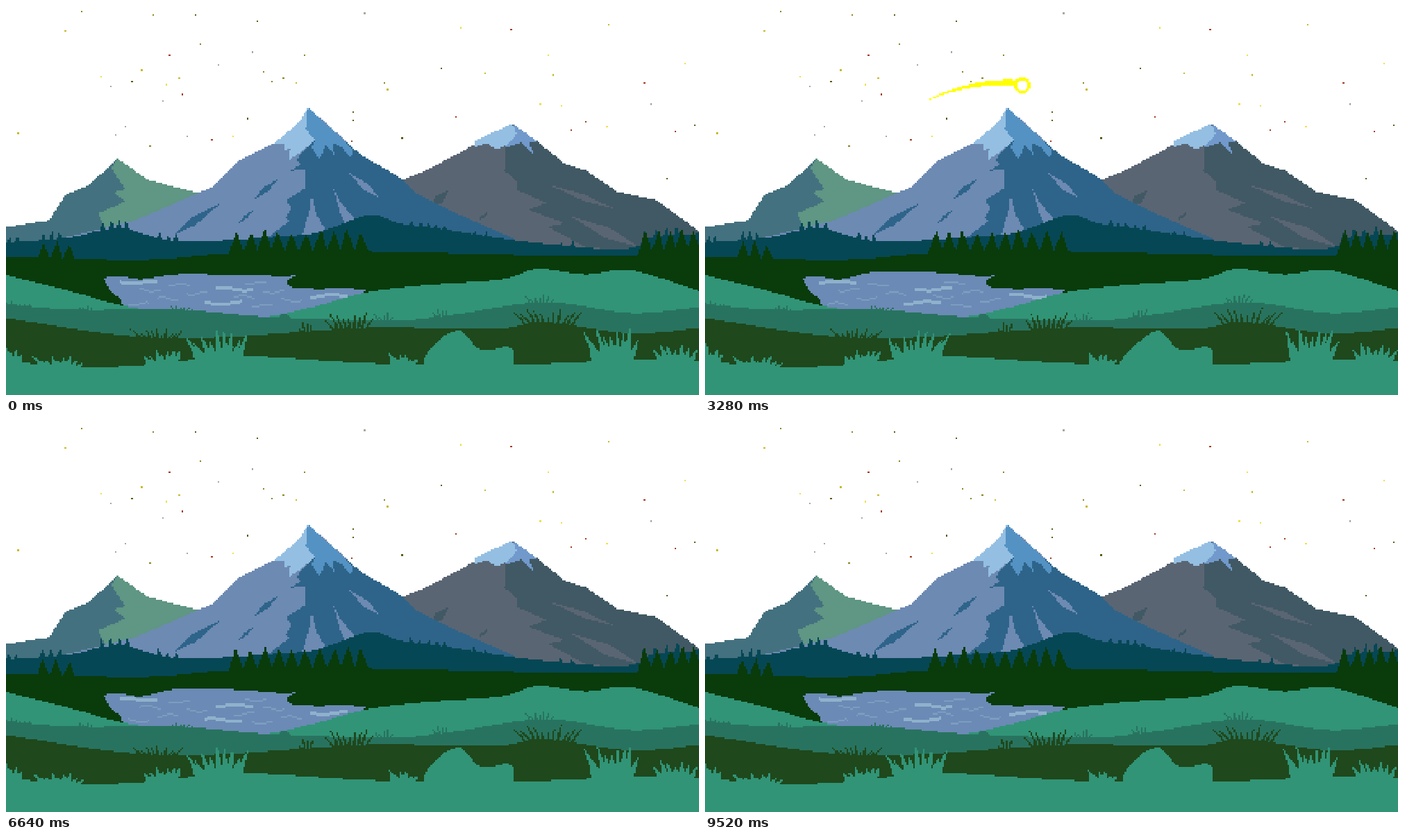
Write an HTML page with a canvas that moves like this. It is 998 by 561 pixels and loops after 9600 ms.

```html
<!DOCTYPE html>
<html lang="en">
<head>
<meta charset="utf-8">
<title>Mountain valley</title>
<style>
html, body { margin: 0; width: 100%; height: 100%; overflow: hidden; background: #fff; }
canvas { display: block; width: 998px; height: 561px; image-rendering: pixelated; }
</style>
</head>
<body>
<canvas id="c" width="426" height="240"></canvas>
<script>
const W = 426, H = 240, SX = W / 998, SY = H / 561, LOOP = 9600, STEP = 80, TAU = Math.PI * 2;
const ctx = document.getElementById('c').getContext('2d');
const image = ctx.createImageData(W, H);
const px = new Uint32Array(image.data.buffer);

const rgb = hex => {
  const n = parseInt(hex.slice(1), 16);
  return (0xff000000 | (n & 255) << 16 | (n & 0xff00) | n >> 16) >>> 0;
};
const lerp = (a, b, k) => a + (b - a) * k;
const rand = n => {
  const v = Math.sin(n * 12.9898 + 4.1) * 43758.5453;
  return v - Math.floor(v);
};

const WHITE = rgb('#ffffff');
const TEAL = '#064755', PINE = '#0a3b0b', HILL = '#319477', MID = '#28735f', OLIVE = '#1f481c', WATER = '#6b8ab5';
let sky = null;

// Hard-edged even-odd fill; points are in stage coordinates.
function poly(hex, pts, mask) {
  const col = rgb(hex), n = pts.length;
  for (let y = 0; y < H; y++) {
    const xs = [];
    for (let i = 0; i < n; i += 2) {
      const j = (i + 2) % n, ya = pts[i + 1] * SY, yb = pts[j + 1] * SY;
      if ((ya <= y + .5) !== (yb <= y + .5)) {
        xs.push(lerp(pts[i], pts[j], (y + .5 - ya) / (yb - ya)) * SX);
      }
    }
    xs.sort((a, b) => a - b);
    for (let k = 0; k + 1 < xs.length; k += 2) {
      const end = Math.min(W, Math.ceil(xs[k + 1] - .5));
      for (let x = Math.max(0, Math.ceil(xs[k] - .5)); x < end; x++) {
        if (!mask || mask[y * W + x]) px[y * W + x] = col;
      }
    }
  }
}

// Catmull-Rom through an open list of points.
function curve(p) {
  const out = [], n = p.length / 2;
  const at = (i, d) => p[Math.max(0, Math.min(n - 1, i)) * 2 + d];
  for (let i = 0; i < n - 1; i++) {
    for (let u = 0; u < 1; u += .125) {
      for (let d = 0; d < 2; d++) {
        const a = at(i - 1, d), b = at(i, d), c = at(i + 1, d), e = at(i + 2, d);
        out.push(b + .5 * u * (c - a + u * (2 * a - 5 * b + 4 * c - e + u * (3 * (b - c) + e - a))));
      }
    }
  }
  out.push(...p.slice(-2));
  return out;
}

const ground = (hex, line) => poly(hex, [...line, 998, 561, 0, 561]);

// Height of a ground line at x.
function heightAt(line, x) {
  let i = 0;
  while (i < line.length - 4 && line[i + 2] < x) i += 2;
  return lerp(line[i + 1], line[i + 3], (x - line[i]) / (line[i + 2] - line[i]));
}

// Tapered streak between two points.
function gash(hex, x0, y0, x1, y1, w) {
  const len = Math.hypot(x1 - x0, y1 - y0), dx = (y1 - y0) / len * w / 2, dy = (x0 - x1) / len * w / 2;
  const mx = lerp(x0, x1, .55), my = lerp(y0, y1, .55);
  poly(hex, [x0, y0, mx + dx, my + dy, x1, y1, mx - dx, my - dy]);
}

function drawMountains() {
  const light = '#6d8ab3', dark = '#2e6489', slate = '#5a6573', shade = '#415964', ice = '#94bfe2';

  poly('#44717f', [0,319, 62,309, 85,273, 118,259, 135,244, 160,220, 205,251, 278,270, 320,300, 180,340, 0,350]);
  poly('#5f9684', [160,220, 205,251, 278,270, 300,300, 145,325, 132,299, 172,282, 155,269, 172,264, 152,235]);

  const slateEdge = [765,195, 805,228, 835,237, 880,268, 937,280, 998,325, 998,360];
  poly(slate, [568,252, 605,237, 660,208, 728,170, ...slateEdge, 700,360, 592,290]);
  poly(shade, [730,172, ...slateEdge, 835,348, 780,318, 805,313, 752,294, 778,284, 735,265, 735,252, 718,238, 720,203]);
  gash(slate, 782, 258, 875, 292, 9);
  gash(slate, 813, 303, 910, 347, 16);
  gash(shade, 638, 265, 612, 290, 13);
  gash(shade, 697, 295, 678, 311, 5);
  poly(ice, [728,170, 676,194, 674,204, 692,198, 706,207, 722,200, 738,182]);
  poly('#7199cb', [730,170, 765,195, 753,198, 760,214, 742,197, 718,205, 735,185]);

  const blueEdge = [492,197, 510,214, 568,248, 592,271, 640,295, 735,336];
  poly(light, [435,146, 423,167, 388,197, 337,222, 295,262, 186,309, 80,335, 240,355, 760,355, ...blueEdge.slice(0, 10).reverse().flatMap((v, i, a) => i % 2 ? [v, a[i - 1]] : [])]);
  poly(dark, [440,195, 418,222, 425,228, 410,238, 432,235, 432,262, 404,280, 411,292, 403,305, 408,310, 374,336, 735,337, ...blueEdge.slice(0, 10).reverse().flatMap((v, i, a) => i % 2 ? [v, a[i - 1]] : [])]);
  poly(light, [440,272, 447,300, 462,325, 425,335, 436,300]);
  poly(light, [471,263, 482,284, 510,314, 490,318, 482,300]);
  gash(light, 494, 241, 538, 277, 11);
  gash(dark, 393, 249, 357, 279, 8);
  gash(dark, 308, 285, 240, 331, 12);
  gash(dark, 358, 293, 335, 313, 6);
  poly(ice, [435,146, 423,167, 386,198, 402,200, 400,209, 409,205, 408,222, 428,208, 445,193]);
  poly('#5492c4', [435,146, 500,207, 497,219, 483,203, 470,197, 473,215, 460,201, 452,222, 440,204, 445,193, 432,178]);
}

function drawStars() {
  const tints = ['#8a8420', '#5c5a12', '#c9b92a', '#efe04a', '#a03a1c', '#a8a8a0'];
  for (let i = 0; i < 60; i++) {
    const x = Math.floor(rand(i) * W), y = Math.floor(rand(i + 100) * 105) + 2;
    if (sky[y * W + x]) px[y * W + x] = rgb(tints[i % tints.length]);
  }
}

function buildBase() {
  px.fill(WHITE);
  drawMountains();
  sky = px.map(v => v === WHITE ? 1 : 0);
  drawStars();
  return px.slice();
}

function disc(x, y, r) {
  const out = [];
  for (let a = 0; a < TAU; a += TAU / 24) out.push(x + r * Math.cos(a), y + r * Math.sin(a));
  return out;
}

function drawComet(t) {
  if (t < 2480 || t > 4080) return;
  const path = x => 112 + .0022 * (x - 425) ** 2;
  const x = 457 + .4 * (t - 3280), y = path(x), upper = [], lower = [];
  for (let k = 0; k <= 1; k += 1 / 16) {
    const tx = x - 136 * (1 - k), half = .8 + 4.2 * k, ty = path(tx) - 2 * k;
    upper.push(tx, ty - half);
    lower.unshift(tx, ty + half);
  }
  poly('#ffff00', [...upper, ...lower], sky);
  poly('#ffff00', disc(x, y, 11.7), sky);
  poly('#ffffff', disc(x, y, 7.4), sky);
}

const far = curve([0,341, 90,334, 130,325, 170,321, 250,339, 400,332, 450,326, 500,308, 530,301, 570,314, 630,322, 700,333, 760,341, 870,351, 910,346, 930,334, 998,328]);
const wood = curve([0,362, 200,366, 330,356, 515,354, 740,359, 880,360, 998,355]);
const near = curve([0,388, 95,412, 190,436, 350,449, 430,437, 515,414, 600,403, 715,394, 765,379, 835,387, 900,381, 998,411]);
const slope = curve([0,430, 100,438, 250,438, 370,448, 550,454, 640,446, 775,427, 900,443, 998,434]);
const dirt = curve([0,450, 170,475, 300,478, 520,464, 700,466, 775,456, 900,472, 998,464]);
const front = curve([0,512, 110,521, 210,517, 340,505, 550,516, 805,515, 870,508, 998,513]);

// A row of firs standing on a ground line.
function trees(hex, line, x0, x1, n, tall, half, t) {
  for (let i = 0; i < n; i++) {
    const x = lerp(x0, x1, (i + .5) / n), y = heightAt(line, x), a = TAU * t / 2400 + i * 1.3;
    const tip = y - tall * (.75 + .25 * rand(x0 + i)) + 1.2 * Math.cos(a);
    poly(hex, [x + 2 * Math.sin(a), tip, x + half, y + 4, x - half, y + 4]);
  }
}

// A tuft whose blades fan out from its middle and bend with the wind.
function grass(hex, line, x0, x1, n, tall, width, wind) {
  const mid = (x0 + x1) / 2;
  for (let i = 0; i < n; i++) {
    const x = lerp(x0, x1, i / (n - 1)), root = lerp(mid, x, .65), base = heightAt(line, root) + 3;
    const h = tall * (.5 + .5 * rand(x0 + i * 7)), tip = x + wind * h * .09;
    const mx = lerp(root, x, .35), my = base - h * .45;
    poly(hex, [tip - .8, base - h, tip + .8, base - h, mx + width * .35, my,
      root + width / 2, base, root - width / 2, base, mx - width * .35, my]);
  }
}

function drawLake(t) {
  const top = 384.5 + 2.5 * Math.cos(TAU * t / LOOP);
  poly(WATER, curve([140,392, 165,390, 195,394, 245,top, 300,top, 350,lerp(388, top, .5), 400,390, 420,388, 405,396, 420,407,
    505,408, 514,413, 480,430, 360,455, 190,439, 165,423, 148,407, 140,392]));
  drawRipples(t);
}

// Wavy strokes, kept on the water.
function drawRipples(t) {
  const water = rgb(WATER);
  for (let i = 0; i < 15; i++) {
    const bright = i % 4 === 0, len = bright ? 52 : 30, h = bright ? 2 : 1;
    const x0 = 165 + 290 * ((i * .618) % 1), y0 = 396 + i * 2.5;
    for (let k = 0; k < 1; k += 1 / (len * SX)) {
      const x = Math.round((x0 + k * len) * SX);
      const y = Math.round((y0 + 2 * Math.sin(k * 5 + i + TAU * t / LOOP)) * SY);
      for (let j = 0; j < h; j++) {
        const p = (y + j) * W + x;
        if (px[p] === water) px[p] = rgb(bright ? '#8fb1cc' : '#7d9cc0');
      }
    }
  }
}

function drawForest(t) {
  const teal = (x0, x1, n, tall) => trees(TEAL, far, x0, x1, n, tall, 5, t);
  ground(TEAL, far);
  teal(0, 20, 2, 10);
  teal(48, 82, 3, 13);
  teal(133, 180, 4, 14);
  teal(215, 250, 3, 10);
  teal(578, 638, 5, 9);
  teal(668, 698, 2, 7);
  teal(792, 822, 2, 9);
  teal(912, 974, 4, 15);

  ground(PINE, wood);
  trees(PINE, wood, 45, 99, 3, 26, 10, t);
  trees(PINE, wood, 322, 522, 10, 34, 12, t);
  trees(PINE, wood, 912, 1000, 5, 37, 12, t);
}

function drawMeadow(wind) {
  const mid = (x0, x1, n, tall) => grass(MID, slope, x0, x1, n, tall, 4, wind);
  const olive = (x0, x1, n, tall) => grass(OLIVE, dirt, x0, x1, n, tall, 5, wind);
  const green = (x0, x1, n, tall) => grass(HILL, front, x0, x1, n, tall, 11, wind);

  ground(HILL, near);
  mid(0, 36, 6, 9);
  mid(100, 125, 5, 9);
  mid(238, 270, 6, 9);
  mid(532, 557, 5, 16);
  mid(616, 636, 4, 16);
  mid(748, 790, 7, 15);
  ground(MID, slope);
  poly(MID, disc(401, 453, 9));

  olive(180, 256, 11, 17);
  olive(422, 442, 4, 16);
  olive(460, 530, 9, 26);
  olive(731, 831, 11, 25);
  ground(OLIVE, dirt);

  green(-8, 24, 5, 30);
  green(40, 112, 9, 17);
  green(200, 252, 7, 28);
  green(262, 350, 9, 46);
  green(553, 592, 6, 20);
  green(835, 912, 9, 47);
  green(933, 996, 7, 34);
  drawRock(wind);
  ground(HILL, front);
}

// The boulder leans as its left flank slumps outward.
function drawRock(wind) {
  const k = Math.min(1, Math.max(0, .5 + wind));
  poly(HILL, curve([601 - 6 * k,518, 607 - 2 * k,500 + 4 * k, 630,476 + 4 * k, 651,468, 664,476, 680,494,
    700,496, 714,492, 730,495, 732,518]));
}

function draw(t) {
  px.set(base);
  drawComet(t);
  drawForest(t);
  drawLake(t);
  drawMeadow(-Math.cos(TAU * (t - 60) / 960));
  ctx.putImageData(image, 0, 0);
}

const base = buildBase();
const start = performance.now();
let last = -1;

function tick() {
  const t = Math.floor((performance.now() - start) % LOOP / STEP) * STEP;
  if (t !== last) draw(last = t);
  requestAnimationFrame(tick);
}
tick();
</script>
</body>
</html>
```
